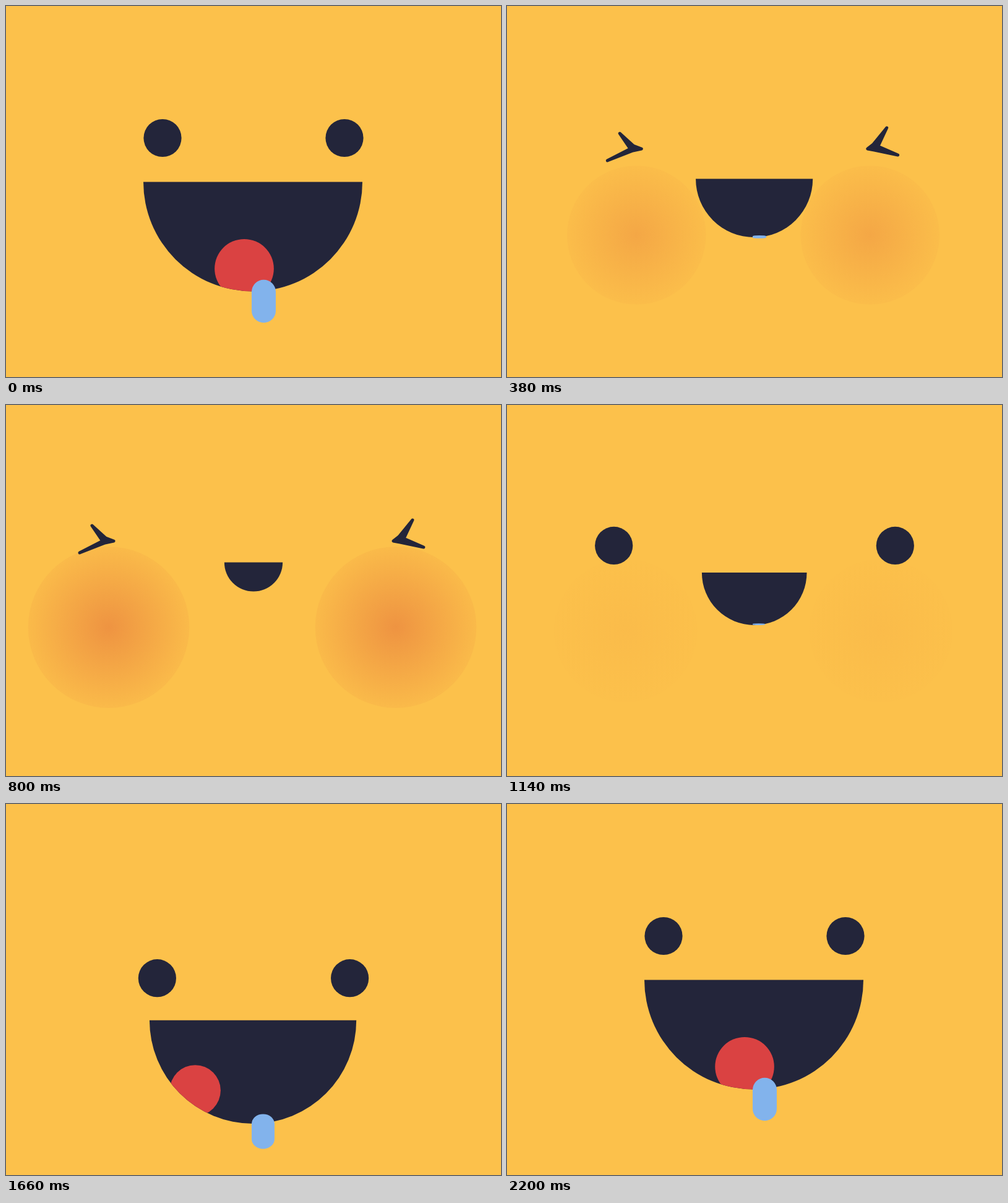
These frames come from a looping animation (800x600 px, 2.22 s). An HTML page with a canvas:

```html
<!DOCTYPE html>
<html lang="en">
<head>
<meta charset="utf-8">
<title>Happy face</title>
<style>
  html, body { margin: 0; height: 100%; overflow: hidden; background: #fcc14b; }
  canvas { display: block; }
</style>
</head>
<body>
<canvas id="stage" width="800" height="600"></canvas>
<script>
const ctx = document.getElementById('stage').getContext('2d');
const LOOP = 2220;
const DARK = '#23253a';

// Both go from 0 to 1 between the times a and b.
const progress = (t, a, b) => Math.min(1, Math.max(0, (t - a) / (b - a)));
const soft = (t, a, b) => (1 - Math.cos(Math.PI * progress(t, a, b))) / 2;
const sharp = (t, a, b) => {
  const u = progress(t, a, b);
  return u < .5 ? 4 * u ** 3 : 1 - 4 * (1 - u) ** 3;
};

// The face nods a little, rests, sinks and jumps back up.
const eyeHeight = t => 213.5
  + 19.5 * sharp(t, 0, 400) - 11 * sharp(t, 400, 800)
  + 60 * sharp(t, 960, 1600) - 68.5 * sharp(t, 1600, 2200);

const leftWink = new Path2D('M-8 -25L14 -5L27 0L13 3L-28 19L9 0Z');
const rightWink = new Path2D('M4 -34L-18 -7L-27 0L-16 2L22 10L-10 -4Z');

function disc(x, y, r, fill) {
  ctx.fillStyle = fill;
  ctx.beginPath();
  ctx.arc(x, y, r, 0, 2 * Math.PI);
  ctx.fill();
}

function cheek(x, y, r, strength) {
  const glow = ctx.createRadialGradient(x, y, 0, x, y, r);
  glow.addColorStop(0, `rgba(236, 140, 64, ${.86 * strength})`);
  glow.addColorStop(1, `rgba(236, 140, 64, ${.13 * strength})`);
  disc(x, y, r, glow);
}

function eye(x, y, wink) {
  if (!wink) return disc(x, y, 30.6, DARK);
  ctx.save();
  ctx.translate(x, y - 2);
  ctx.fillStyle = ctx.strokeStyle = DARK;
  ctx.lineWidth = 5;
  ctx.lineJoin = 'round';
  ctx.fill(wink);
  ctx.stroke(wink);
  ctx.restore();
}

function mouth(t, x, y, r, squeeze) {
  ctx.save();
  ctx.beginPath();
  ctx.arc(x, y, r, 0, Math.PI);
  ctx.fillStyle = DARK;
  ctx.fill();
  ctx.clip();

  // The tongue swings in from the left and comes to rest after the loop restarts.
  const swing = 1 - soft(t < 1100 ? t + LOOP : t, 1200, 2300);
  const angle = (5 + 55 * swing) * Math.PI / 180;
  const reach = 141 + 34 * swing ** 4 + 10 * squeeze;
  disc(x - reach * Math.sin(angle), y + reach * Math.cos(angle), 48 - 11 * swing, '#da4242');
  ctx.restore();
}

function drop(bottom, squeeze) {
  const width = 39 * (1 - .7 * squeeze), length = 69.5 * (1 - squeeze) ** 2.7;
  if (length < .5) return;
  ctx.fillStyle = '#82b3ec';
  ctx.beginPath();
  ctx.roundRect(397, bottom - 2 - .24 * length, width, length, { x: width / 2, y: .28 * length });
  ctx.fill();
}

function draw(t) {
  const squeeze = soft(t, 0, 655) - soft(t, 720, 1863);
  const spread = 147 + 106 * (soft(t, 0, 682) - soft(t, 792, 1857));
  const blush = soft(t, 0, 700) - soft(t, 800, 1240);
  const eyeY = eyeHeight(t);
  const mouthY = eyeY + 71 - 39 * squeeze, mouthR = 177 - 131.5 * squeeze;
  const winking = t >= 200 && t < 1140;

  ctx.fillStyle = '#fcc14b';
  ctx.fillRect(0, 0, 800, 600);
  for (const side of [-1, 1]) {
    cheek(398 + side * (spread - 21), eyeY + 137.5, 81 + 50 * squeeze, blush);
    eye(400 + side * spread, eyeY, winking && (side < 0 ? leftWink : rightWink));
  }
  mouth(t, 399 + squeeze, mouthY, mouthR, squeeze);
  drop(mouthY + mouthR, squeeze);
}

function frame() {
  draw(performance.now() % LOOP);
  requestAnimationFrame(frame);
}
frame();
</script>
</body>
</html>
```
